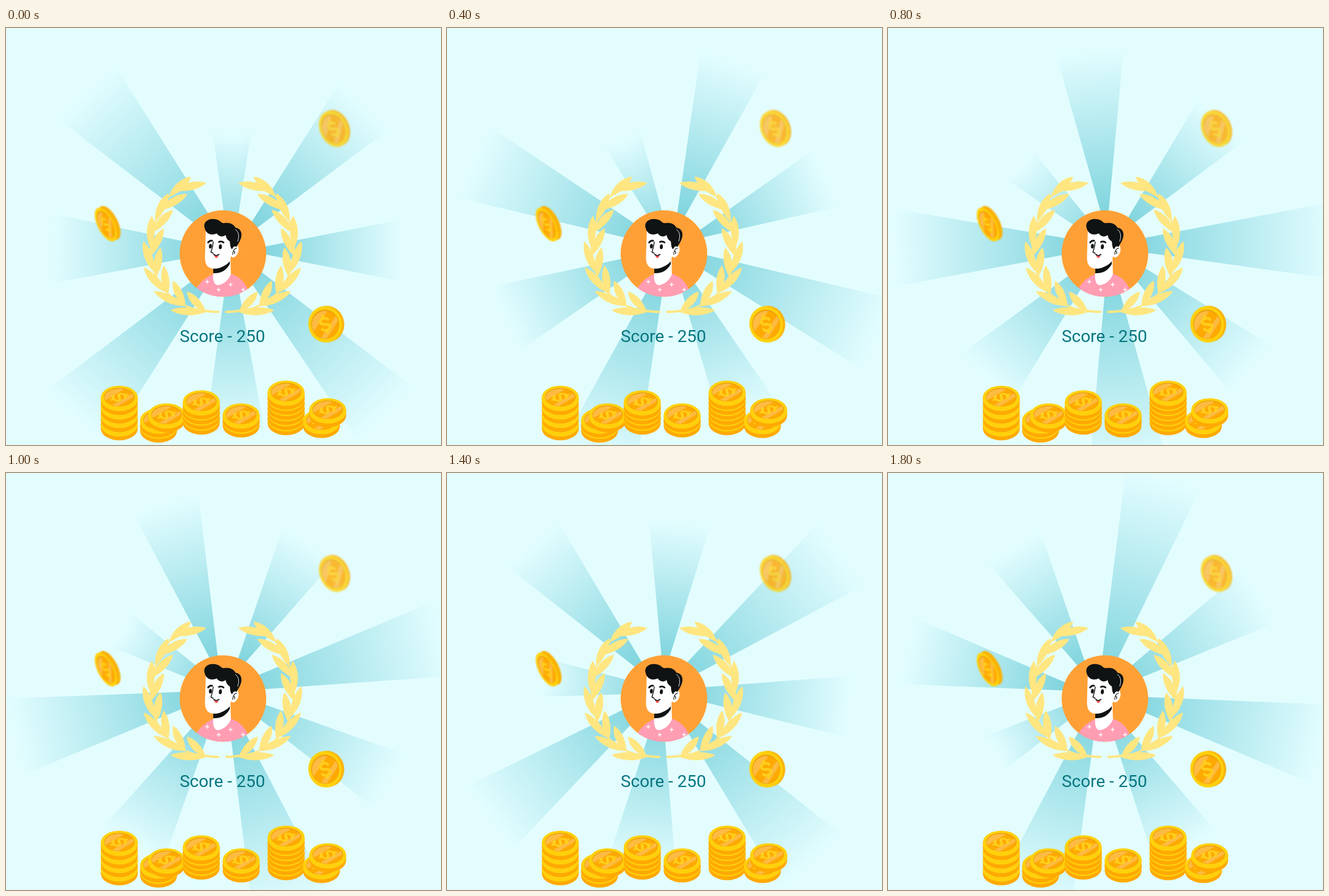
An HTML page with a canvas that plays this animation: 764x733 px, repeating every 2 s.

```html
<!DOCTYPE html>
<html lang="en">
<head>
<meta charset="utf-8">
<title>Score</title>
<style>
html, body { margin: 0; width: 100%; height: 100%; overflow: hidden; background: #e3fdff; }
canvas { display: block; }
</style>
</head>
<body>
<canvas id="stage" width="764" height="733"></canvas>
<script>
const W = 764, H = 733, TAU = Math.PI * 2, DEG = Math.PI / 180;
const LOOP = 2000, STEP = 200, TURN = 12;
const HUB = { x: 382, y: 397 }, FAN = { x: 395, y: 391 };
const GOLD = '#ffd00c', AMBER = '#ffa903', INK = '#101313', LEAF = '#ffe681';
const symbol = new Path2D('M8-7C6-13-8-13-8-6C-8 1 8-1 8 6C8 13-6 13-8 7M0-11V-16M0 11V16');

const stage = document.getElementById('stage').getContext('2d');
let ctx = stage;

// runs a drawing on another surface
function paintOn(surface, paint) {
  const previous = ctx;
  ctx = surface;
  paint();
  ctx = previous;
}

function makeLayer(w, h, paint) {
  const layer = new OffscreenCanvas(w, h);
  paintOn(layer.getContext('2d'), paint);
  return layer;
}

function fill(path, color) {
  ctx.fillStyle = color;
  ctx.fill(new Path2D(path));
}

function line(path, color, width) {
  ctx.strokeStyle = color;
  ctx.lineWidth = width;
  ctx.lineCap = ctx.lineJoin = 'round';
  ctx.stroke(new Path2D(path));
}

function ellipse(x, y, rx, ry, color, rot = 0) {
  ctx.beginPath();
  ctx.ellipse(x, y, rx, ry, rot, 0, TAU);
  ctx.fillStyle = color;
  ctx.fill();
}

function drawRay(angle, spread, length, push, rounded) {
  ctx.save();
  ctx.translate(FAN.x, FAN.y);
  ctx.rotate(angle * DEG);
  ctx.translate(0, -push);
  const cap = 68, side = Math.tan(spread * DEG) * length;
  const shade = rounded
    ? ctx.createRadialGradient(0, 0, 0, 0, cap - length, cap)
    : ctx.createLinearGradient(0, 0, 0, -length);
  shade.addColorStop(0, 'rgba(115,207,217,1)');
  shade.addColorStop(1, 'rgba(115,207,217,0)');
  ctx.beginPath();
  ctx.moveTo(0, 0);
  ctx.lineTo(-side, -length);
  ctx.lineTo(side, -length);
  ctx.fillStyle = shade;
  ctx.fill();
  ctx.restore();
}

function drawRays(turn) {
  ctx.save();
  ctx.translate(HUB.x, HUB.y);
  ctx.rotate(-turn * DEG);
  ctx.translate(-HUB.x, -HUB.y);
  drawRay(0.5, 8.3, 364, -23, true);
  drawRay(42.7, 10.5, 322, 23);
  drawRay(90, 11.2, 274, 25);
  drawRay(136.6, 9.4, 410, -13);
  drawRay(178.7, 9.1, 338, -7);
  drawRay(222.7, 10.3, 392, 9);
  drawRay(270.6, 11.3, 308, 7);
  drawRay(317.6, 10.2, 382, -5);
  ctx.restore();
}

function coinFace(rx, ry, spin) {
  ellipse(0, 0, rx, ry, GOLD);
  ellipse(0, 0, rx * .83, ry * .8, '#e9990c');
  ctx.save();
  ctx.scale(rx * .8 / 26, ry * .77 / 26);
  ellipse(0, .8, 26, 25.5, AMBER);
  ctx.clip();
  fill('M-30 14L16-30L-30-30ZM-17 27L28-16L28-4L-6 30Z', '#fdbb42');
  ctx.rotate(spin);
  ctx.strokeStyle = '#ffcf1c';
  ctx.lineWidth = 5;
  ctx.lineCap = 'round';
  ctx.stroke(symbol);
  ctx.restore();
}

function stackCoin(x, y) {
  const rx = 32.3, ry = 20.3;
  const drum = (h, color) => {
    ellipse(0, h, rx, ry, color);
    ctx.fillRect(-rx, 0, rx * 2, h);
  };
  ctx.save();
  ctx.translate(x, y);
  drum(10.5, AMBER);
  drum(4, GOLD);
  coinFace(rx, ry, 1.05);
  ctx.restore();
}

function drawStack(x, top, count = 1, gap = 9) {
  for (let i = count - 1; i >= 0; i--) stackCoin(x, top + i * gap);
}

function flyingCoin(x, y, rx, ry, tilt, depth, blur, alpha) {
  const size = 90;
  const coin = makeLayer(size, size, () => {
    ctx.translate(size / 2, size / 2);
    ctx.rotate(tilt);
    ellipse(depth / 2, 0, rx, ry, '#f9b208');
    ctx.translate(-depth / 2, 0);
    coinFace(rx, ry, -.1);
  });
  ctx.save();
  ctx.globalAlpha = alpha;
  ctx.filter = `blur(${blur}px)`;
  ctx.drawImage(coin, x - size / 2, y - size / 2);
  ctx.restore();
}

function stemPoint(t) {
  const u = 1 - t;
  const mix = (a, b, c, d) => u * u * u * a + 3 * u * u * t * b + 3 * u * t * t * c + t * t * t * d;
  return [mix(373, 240, 225, 296), mix(499, 500, 355, 286)];
}

function drawLeaf(t, angle, length) {
  ctx.save();
  ctx.translate(...stemPoint(t));
  ctx.rotate(angle * DEG);
  ctx.scale(1, length / 55);
  fill('M0 0C-11-20-8-42 2-55C9-42 9-20 0 0Z', LEAF);
  ctx.restore();
}

function drawBranch() {
  line('M373 499C240 500 225 355 296 286', LEAF, 2.8);
  line('M340 495Q356 499 373 499', LEAF, 4);
  for (let k = 0; k < 7; k++)
    drawLeaf(.05 + .9 * (k / 6) ** 1.15, -90 + 22.6 * k, 65 - 2 * k);
  for (let k = 0; k < 8; k++)
    drawLeaf(.06 + .94 * (k / 7) ** 1.1, -46 + 17.2 * k, 47 + 1.5 * k);
}

function drawLaurel() {
  drawBranch();
  ctx.save();
  ctx.translate(760, 0);
  ctx.scale(-1, 1);
  drawBranch();
  ctx.restore();
}

function drawAvatar() {
  ctx.save();
  ellipse(381, 396.5, 76, 76, '#ffa036');
  ctx.clip();
  fill('M326 480C333 450 350 438 365 432L395 432C412 438 424 448 431 480Z', '#ff9db3');
  fill('M364 415L394 396L395 433C391 444 380 452 371 452C364 450 363 440 364 432Z', '#fff');
  fill('M364 422C377 422 387 418 393 410L393 415C387 426 377 432 364 431Z', INK);
  ellipse(401, 392, 7, 11.5, '#fff', .3);
  fill('M351 352L349.5 402C349 419 357 424 369 423C384 421 393 411 397 397L397 360L376 345Z', '#fff');
  fill('M349 352C345 339 359 333 371 337C377 339 378 343 382 343C391 341 400 344 403 351' +
       'C412 352 415 360 413 368C411 376 407 380 405 385C401 382 399 385 397 389' +
       'C393 385 394 379 393 375C389 373 386 368 386 364C380 368 374 367 370 361' +
       'C360 366 351 361 349 352Z', INK);
  line('M403 354Q412 360 407 375', '#fff', .9);
  line('M405 387Q399 388 398 398M400 392Q403 394 401 397', INK, 1.2);
  line('M355 377Q358 373 362 374M374 376Q378 374 382 377', INK, 3);
  ellipse(359, 383.5, 2.6, 4, INK, .1);
  ellipse(376.5, 384.5, 2.7, 4.3, INK, .1);
  line('M364 376Q363 385 360 394L364 396', INK, 1.5);
  line('M365 398Q369 402 374 398', INK, 1.8);
  fill('M366 400Q370 400 373 401Q371 406 367 403Z', '#ee4b48');
  line('M350.5 446h6m-3-3v6M370.5 460h6m-3-3v6M391.5 451h6m-3-3v6M413.5 460h6m-3-3v6', '#fff', 1.4);
  ctx.restore();
}

function drawForeground() {
  flyingCoin(577, 176.5, 24, 33, -.42, 4, 1.8, .82);
  flyingCoin(178.5, 344, 14.5, 32.5, -.47, 7, .9, 1);
  flyingCoin(562.5, 520.5, 29.5, 32, -.2, 4, .5, 1);
  drawLaurel();
  drawAvatar();
  ctx.fillStyle = '#087680';
  ctx.font = '30px Roboto, sans-serif';
  ctx.textAlign = 'center';
  ctx.fillText('Score - 250', 380, 551.5);
  drawStack(199, 649, 4, 15);
  drawStack(268, 689, 2);
  drawStack(282, 680);
  drawStack(343, 657, 4);
  drawStack(413, 680, 2);
  drawStack(492, 640, 6);
  drawStack(554, 690);
  drawStack(565, 671);
}

const foreground = makeLayer(W, H, drawForeground);

// the wheel turns in hard steps, the last one doubled
function turnAt(time) {
  const step = Math.floor(time % LOOP / STEP);
  return TURN * (step === LOOP / STEP - 1 ? step + 1 : step);
}

let start;
function frame(now) {
  start ??= now;
  ctx.fillStyle = '#e3fdff';
  ctx.fillRect(0, 0, W, H);
  drawRays(turnAt(Math.max(0, now - start)));
  ctx.drawImage(foreground, 0, 0);
  requestAnimationFrame(frame);
}
requestAnimationFrame(frame);
</script>
</body>
</html>
```
